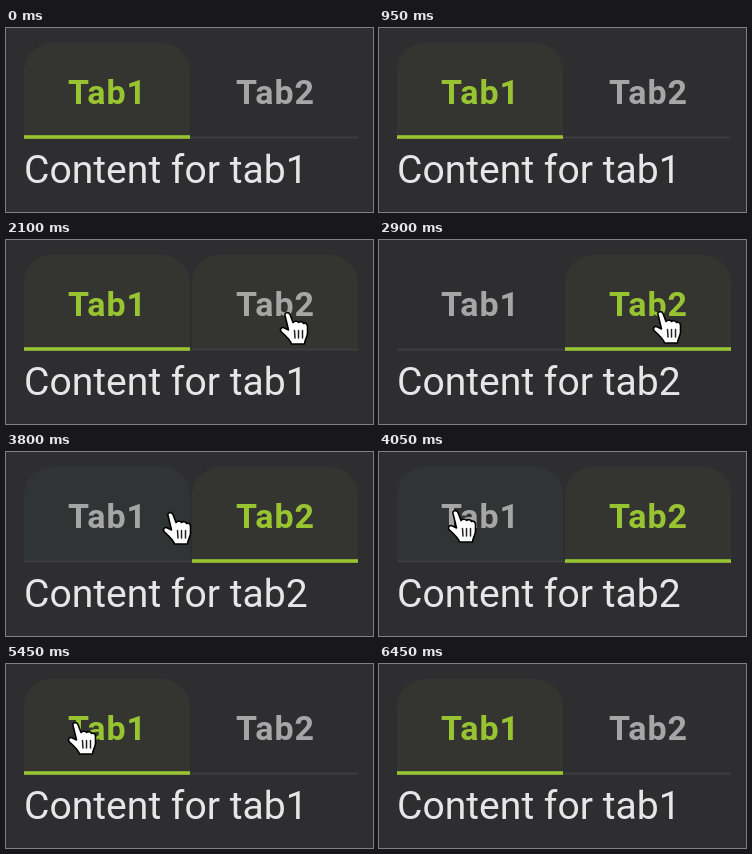
Write an HTML page that moves like this. It is 367 px wide and 184 px high and loops after 6800 ms.

```html
<!DOCTYPE html>
<html lang="en">
<head>
<meta charset="utf-8">
<title>Tabs</title>
<style>
  html, body { margin: 0; width: 100%; height: 100%; overflow: hidden; background: #2e2e31; }
  svg { display: block; width: 367px; height: 184px; }
  text { font-family: Roboto, Arial, sans-serif; }
  .label { font-size: 34px; font-weight: 700; letter-spacing: .02857em; text-anchor: middle; }
</style>
</head>
<body>
<svg viewBox="0 0 367 184">
  <rect width="367" height="184" fill="#2e2e31"/>
  <path id="fill1" d="M18 110V43A28 28 0 0 1 46 15H156A28 28 0 0 1 184 43V110Z"/>
  <path id="fill2" d="M186 110V43A28 28 0 0 1 214 15H324A28 28 0 0 1 352 43V110Z"/>
  <rect x="18" y="108.5" width="334" height="2" fill="#3d3d3e"/>
  <rect id="bar1" x="18" y="107.2" width="166" height="3.6" fill="#98c432"/>
  <rect id="bar2" x="186" y="107.2" width="166" height="3.6" fill="#98c432"/>
  <text id="label1" class="label" x="101.5" y="76">Tab1</text>
  <text id="label2" class="label" x="269.5" y="76">Tab2</text>
  <text id="content" x="18" y="155" font-size="39.1" fill="#e6e6e6"></text>

  <g id="hand" stroke-linejoin="round" stroke-linecap="round">
    <path fill="#fff" stroke="#000" stroke-width="1.6" d="M-3 2.5C-4-.5 .5-1.5 2 1.5L5 9.5C6.5 7.5 10 8 10.5 9.5C12 8 15 8.5 15.5 10.5C17.5 9.5 19.5 11 19.5 13.5V20C19.5 24 17 26 16.5 31H3.5C2.5 27-2 23-6.5 19C-9 16.5-6.5 13.5-3.5 15L.5 17Z"/>
    <path fill="none" stroke="#222" stroke-width="1.5" d="M6.5 17.5L7 25M10.5 17.5V25M14.5 17.5V25"/>
  </g>
  <g id="beam" fill="none" stroke-linecap="round">
    <path id="beamShape" d="M-6-15C-2-15 0-13 0-10V10C0 13-2 15-6 15M6-15C2-15 0-13 0-10M6 15C2 15 0 13 0 10M-4 5H4"/>
    <use href="#beamShape" stroke="#fff" stroke-width="5.5"/>
    <use href="#beamShape" stroke="#111" stroke-width="2.4"/>
  </g>
  <path id="arrow" fill="#000" stroke="#fff" stroke-width="2" stroke-linejoin="round" d="M0 0V25L6 19.5L10 29L14.5 27L10.5 18H18Z"/>
</svg>
<script>
const LOOP = 6800, STEP = 50;
const BACK = [46, 46, 49], WARM = [52, 53, 48], COOL = [49, 52, 52];
const GREEN = [152, 196, 50], GREY = [166, 166, 166];
const $ = id => document.getElementById(id);

const ramp = (t, from, to) => Math.min(1, Math.max(0, (t - from) / (to - from)));
const smooth = u => u * u * (3 - 2 * u);
const lerp = (a, b, u) => a + (b - a) * u;
const bezier = (a, b, c, u) => lerp(lerp(a, b, u), lerp(b, c, u), u);

// Each change is [start, end, color]; later changes blend over earlier ones.
function blend(t, first, changes) {
  const color = changes.reduce((base, [from, to, next]) =>
    base.map((v, i) => lerp(v, next[i], ramp(t, from, to))), first);
  return `rgb(${color.map(Math.round)})`;
}

function pointer(t) {
  if (t < 1400 || t >= 5950) return null;
  if (t < 3400) {
    const u = smooth(ramp(t, 1400, 2125));
    return [bezier(140, 223, 282, u), bezier(188, 147, 72, u)];
  }
  if (t < 5700) {
    const across = smooth(ramp(t, 3425, 4125)), up = smooth(ramp(t, 3425, 3925));
    return [lerp(282, 70, across), lerp(72, 59, up)];
  }
  const u = ramp(t, 5670, 5950);
  return [lerp(70, -28, u * u), lerp(59, 57, u)];
}

function cursorKind([x, y]) {
  if (y < 111 && x >= 18) return "hand";
  return y > 120 && y < 165 ? "beam" : "arrow";
}

function draw(t) {
  const second = t >= 2400 && t < 4425;
  $("fill1").setAttribute("fill", blend(t, WARM, [[2400, 2750, BACK], [3725, 3800, COOL], [4400, 4500, WARM]]));
  $("fill2").setAttribute("fill", blend(t, BACK, [[1875, 2000, WARM], [4400, 4500, COOL], [4575, 4800, BACK]]));
  $("label1").setAttribute("fill", blend(t, GREEN, [[2375, 2475, GREY], [4400, 4500, GREEN]]));
  $("label2").setAttribute("fill", blend(t, GREY, [[2375, 2475, GREEN], [4400, 4500, GREY]]));
  $("bar1").setAttribute("opacity", 1 - ramp(t, 2375, 2500) + ramp(t, 4425, 4650));
  $("bar2").setAttribute("opacity", ramp(t, 2375, 2500) - ramp(t, 4400, 4525));
  $("content").textContent = `Content for tab${second ? 2 : 1}`;

  const spot = pointer(t);
  const kind = spot && cursorKind(spot);
  for (const id of ["hand", "beam", "arrow"]) {
    $(id).setAttribute("visibility", id === kind ? "visible" : "hidden");
    if (id === kind) $(id).setAttribute("transform", `translate(${spot.map(Math.round)})`);
  }
}

const start = performance.now();
function tick() {
  const t = (performance.now() - start) % LOOP;
  draw(Math.floor(t / STEP) * STEP);
  requestAnimationFrame(tick);
}
tick();
</script>
</body>
</html>
```
